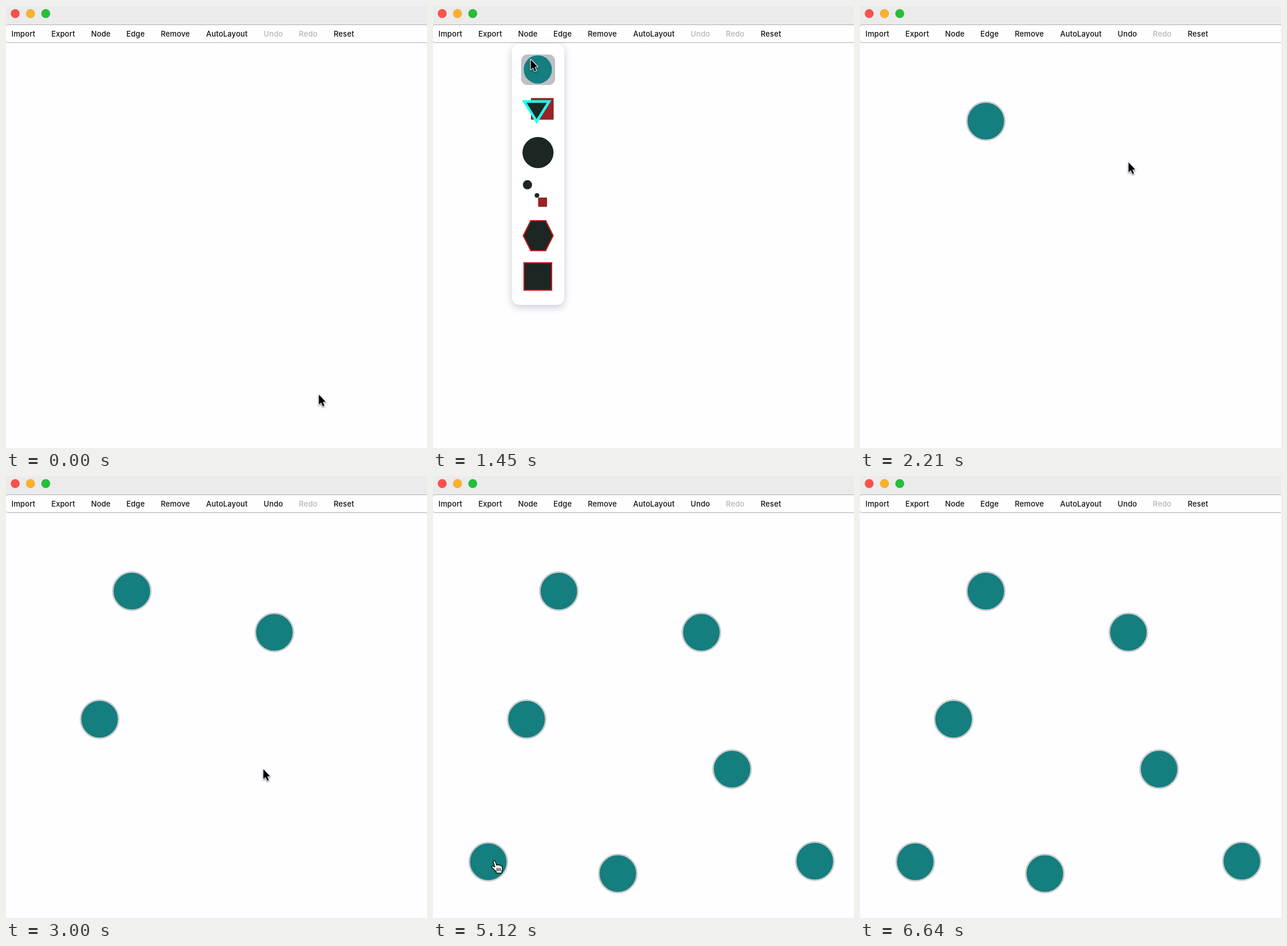
Recreate the animation shown at these times as an HTML page with a canvas. Size 731 by 766 pixels, loop 6670 ms.

```html
<!DOCTYPE html>
<html lang="en">
<head>
<meta charset="utf-8">
<title>Graph editor</title>
<style>
  html, body { margin: 0; width: 100%; height: 100%; overflow: hidden; background: #fefdff; }
  canvas { display: block; }
</style>
</head>
<body>
<canvas id="stage" width="731" height="766"></canvas>
<script>
const W = 731, H = 766, LOOP = 6670;
const stage = document.getElementById('stage').getContext('2d');
let ctx = stage;

const TEAL = '#157e7f', DARK = '#1c2623', RED = '#c81e1e', BROWN = '#982424';

const MENU = {
  Import: 9.5, Export: 78.7, Node: 147.8, Edge: 209, Remove: 268.7,
  AutoLayout: 347.5, Undo: 447.3, Redo: 508.6, Reset: 569
};

const NODES = [
  { at: 2030, x: 218.5, y: 199.5 },
  { at: 2390, x: 466, y: 271 },
  { at: 2820, x: 162.5, y: 421.5 },
  { at: 3265, x: 519.3, y: 508 },
  { at: 3640, x: 321, y: 689 },
  { at: 4030, x: 663, y: 667.5 },
  { at: 4730, x: 96, y: 668.5 }
];
const LAST = NODES[NODES.length - 1];

// The pointer reaches each spot, rests there, then heads for the next one.
const stop = (from, until, x, y) => [{ t: from, x, y }, { t: until, x, y }];
const PATH = [
  stop(0, 20, 543, 673),
  stop(60, 240, 208, 288),
  stop(760, 870, 163, 48),
  stop(1150, 1700, 169.5, 92.5),
  ...NODES.map(n => stop(n.at - 190, n.at, n.x, n.y - 0.5)),
  stop(4970, 4970, 112, 696),
  stop(5120, 5150, 106, 666),
  stop(5360, 5420, 600, 56),
  stop(5820, LOOP, 692, -30)
].flat();

const clamp = v => Math.max(0, Math.min(1, v));
const smooth = u => { u = clamp(u); return u * u * (3 - 2 * u); };
const ramp = (t, a, b) => smooth((t - a) / (b - a));

// Vertical travel finishes a little ahead of horizontal travel.
function pointerAt(t) {
  const i = PATH.findIndex(k => k.t > t);
  const a = PATH[i - 1], b = PATH[i];
  const u = (t - a.t) / (b.t - a.t);
  return {
    x: a.x + (b.x - a.x) * smooth(u),
    y: a.y + (b.y - a.y) * smooth(u * 1.4)
  };
}

function paint(fill, stroke, width) {
  if (fill) { ctx.fillStyle = fill; ctx.fill(); }
  if (stroke) { ctx.strokeStyle = stroke; ctx.lineWidth = width; ctx.stroke(); }
}

function circle(x, y, r, ...style) {
  ctx.beginPath();
  ctx.arc(x, y, r, 0, Math.PI * 2);
  paint(...style);
}

function box(x, y, w, h, r, ...style) {
  ctx.beginPath();
  ctx.roundRect(x, y, w, h, r);
  paint(...style);
}

function polygon(sides, turn, x, y, rx, ry, ...style) {
  ctx.beginPath();
  for (let i = 0; i < sides; i++) {
    const a = turn + i * 2 * Math.PI / sides;
    ctx.lineTo(x + rx * Math.cos(a), y + ry * Math.sin(a));
  }
  ctx.closePath();
  paint(...style);
}

function shadow(color, blur, dy) {
  ctx.shadowColor = color;
  ctx.shadowBlur = blur;
  ctx.shadowOffsetY = dy;
}
const noShadow = () => shadow('transparent', 0, 0);

function drawWindow(t) {
  ctx.fillStyle = '#fefdff';
  ctx.fillRect(0, 0, W, H);
  ctx.fillStyle = '#ecebeb';
  ctx.fillRect(0, 0, W, 33);
  ['#fc504d', '#fdb127', '#22c037'].forEach((color, i) =>
    circle(16 + 26.5 * i, 13.2, 7.6, color, 'rgba(0, 0, 0, 0.1)', 1));
  box(-0.5, 32.5, W + 20, 31, 4, '#fefefe', '#b0afb0', 1);

  ctx.font = '500 13px Inter, sans-serif';
  ctx.letterSpacing = '0.1px';
  for (const label in MENU) {
    const off = label === 'Redo' || (label === 'Undo' && t < NODES[0].at);
    ctx.fillStyle = off ? '#b6b5b7' : '#111';
    ctx.fillText(label, MENU[label], 53);
  }
}

// The panel is painted on its own layer so that it fades as one piece.
function makePanel(hover) {
  const layer = document.createElement('canvas');
  layer.width = W;
  layer.height = H;
  ctx = layer.getContext('2d');

  shadow('rgba(20, 20, 60, 0.22)', 14, 4);
  box(137, 66, 91, 452, 13, '#fff');
  noShadow();

  if (hover) box(153, 84, 59, 53, 11, '#c0c0c4');
  circle(182, 110, 24.5, TEAL);

  box(170, 159.5, 39.5, 37.5, 1, BROWN);
  polygon(3, Math.PI / 2, 180, 177, 25, 23, DARK, '#20fff0', 4.5);

  circle(182.3, 254, 27, DARK);

  circle(164, 309.8, 8, DARK);
  circle(180.5, 328.3, 4, DARK);
  box(182.5, 332, 15.5, 16, 1, BROWN);

  polygon(6, 0, 182.7, 398, 26, 30, DARK, RED, 2);
  box(158, 445, 48, 47.5, 0, DARK, RED, 2);

  ctx = stage;
  return layer;
}

function drawPanel(t, hover) {
  ctx.globalAlpha = ramp(t, 840, 1000) * (1 - ramp(t, 1550, 1740));
  ctx.drawImage(hover ? hotPanel : idlePanel, 0, 0);
  ctx.globalAlpha = 1;
}

function drawNodes(t) {
  for (const n of NODES) {
    if (t >= n.at) circle(n.x, n.y, 33.1, TEAL, '#cbcbcc', 2.7);
  }
}

const ARROW = new Path2D('M0 0V17L3.9 13.4L6.8 20L9.4 18.9L6.6 12.4L11.6 12.2Z');
const HAND = new Path2D('M-1.6 2Q-.6-1 1.8 1L4 7.8Q5.6 6.4 7.2 8Q8.8 6.8 10.3 8.6' +
  'Q12.3 7.8 13.3 10.2Q15.3 14.5 13 18V21.5H4L3 18.5Q-1 15-4.3 11.6Q-4.6 8.4-1 10L1 11.2Z');

function drawPointer({ x, y }, hand) {
  const shape = hand ? HAND : ARROW;
  ctx.save();
  ctx.translate(x + 0.3, y + 0.5);
  ctx.lineJoin = 'round';
  shadow('rgba(0, 0, 0, 0.35)', 3, 1.5);
  ctx.strokeStyle = ctx.fillStyle = '#fff';
  ctx.lineWidth = 2.4;
  if (!hand) ctx.stroke(shape);
  ctx.fill(shape);
  noShadow();
  ctx.strokeStyle = ctx.fillStyle = '#000';
  ctx.lineWidth = 1.2;
  if (hand) {
    ctx.stroke(shape);
    for (let i = 0; i < 3; i++) ctx.strokeRect(5 + 2.7 * i, 13, 0, 5);
  } else {
    ctx.fill(shape);
  }
  ctx.restore();
}

function draw(t) {
  const p = pointerAt(t);
  const overNode = NODES.some(n => Math.hypot(n.x - p.x, n.y - p.y) < 34);
  drawWindow(t);
  drawPanel(t, p.y > 84);
  drawNodes(t);
  drawPointer(p, t >= LAST.at && overNode);
}

const idlePanel = makePanel(false), hotPanel = makePanel(true);
const begin = performance.now();
function tick() {
  draw((performance.now() - begin) % LOOP);
  requestAnimationFrame(tick);
}
tick();
</script>
</body>
</html>
```
